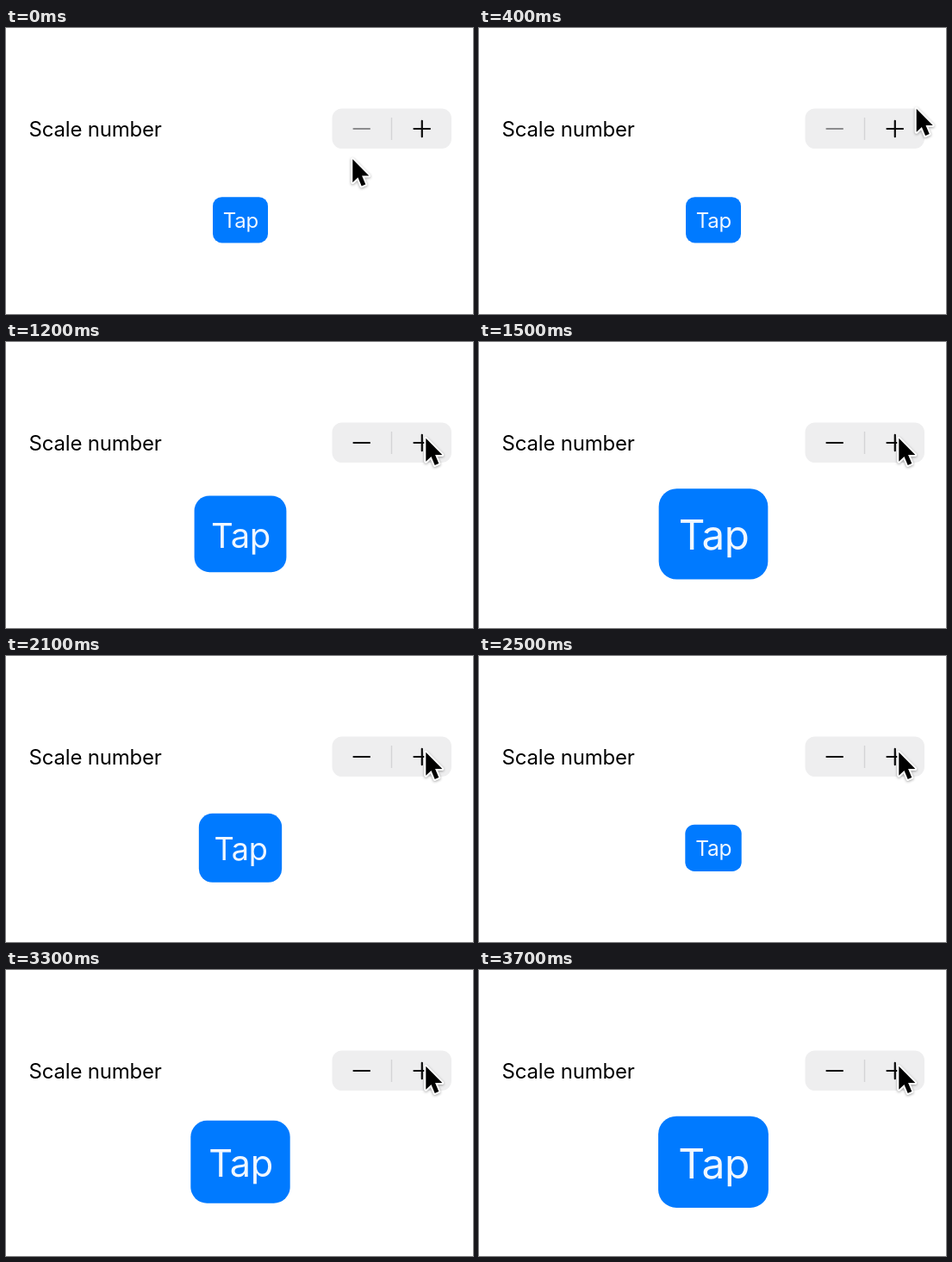
Write an HTML page that moves like this. It is 542 px wide and 332 px high and loops after 3.85 s.

```html
<!DOCTYPE html>
<html lang="en">
<head>
<meta charset="utf-8">
<title>Scale stepper</title>
<style>
  html, body { margin: 0; width: 100%; height: 100%; overflow: hidden; background: #fff; }
  svg { display: block; width: 542px; height: 332px; }
  text { font: 400 24px Inter, Roboto, sans-serif; letter-spacing: -.2px; }
  .sign { stroke: #0b0b0b; stroke-width: 2.2; stroke-linecap: round; }
  #cursor { filter: drop-shadow(0 1.5px 1.5px rgba(0, 0, 0, .35)); }
</style>
</head>
<body>
<svg viewBox="0 0 542 332">
  <text x="26.6" y="126">Scale number</text>

  <rect x="378.5" y="93.5" width="138.5" height="46.5" rx="11.5" fill="#eeeeef"/>
  <path id="press" d="M448 93.5H505.5A11.5 11.5 0 0 1 517 105V128.5A11.5 11.5 0 0 1 505.5 140H448Z" fill="#dedee0"/>
  <path d="M447.5 104V130" stroke="#d4d4d6" stroke-width="1.5"/>
  <path id="minus" class="sign" d="M403.5 117H422"/>
  <path class="sign" d="M473.5 117H492M482.8 107.8V126.2"/>

  <g id="button">
    <rect x="-32" y="-26.6" width="64" height="53.2" rx="10.5" fill="#007aff"/>
    <text x=".3" y="9.4" text-anchor="middle" fill="#fff" fill-opacity=".94">Tap</text>
  </g>

  <path id="cursor" d="M0 0V27L6.2 21.2L10.4 31.2L15 29.2L10.8 19.3H19Z"
        stroke="#fff" stroke-width="4" stroke-linejoin="round" paint-order="stroke"/>
</svg>
<script>
  const LOOP = 3850, STEP = 100, LAST = 3640;
  const TAP = 597, LEG = 1004;
  const [press, minus, button, cursor] =
    ['press', 'minus', 'button', 'cursor'].map(id => document.getElementById(id));

  const clamp = v => Math.min(1, Math.max(0, v));
  const bezier = (a, b, c, d, t) => {
    const u = 1 - t;
    return u * u * u * a + 3 * u * u * t * b + 3 * u * t * t * c + t * t * t * d;
  };

  // cubic-bezier(.42, 0, .58, 1), solved by bisection
  function easeInOut(x) {
    let lo = 0, hi = 1;
    for (let i = 0; i < 24; i++) {
      const mid = (lo + hi) / 2;
      if (bezier(0, .42, .58, 1, mid) < x) lo = mid; else hi = mid;
    }
    return bezier(0, 0, 1, 1, lo);
  }

  // Grows from 1 to 2 and back, one leg each way
  function scaleAt(t) {
    const phase = Math.max(0, t - TAP) / LEG % 2;
    return 1 + easeInOut(phase < 1 ? phase : 2 - phase);
  }

  function draw(now) {
    const t = Math.min(LAST, Math.floor(now % LOOP / STEP) * STEP);
    const p = easeInOut(clamp((t - 20) / 540));
    const x = bezier(402.3, 440, 555, 487.3, p);
    const y = bezier(152.3, 30, 80, 111.8, p);

    cursor.setAttribute('transform', `translate(${x} ${y})`);
    button.setAttribute('transform', `translate(272 222.8) scale(${scaleAt(t)})`);
    press.style.visibility = t === 600 ? 'visible' : 'hidden';
    minus.style.stroke = t < 600 ? '#8c8c8e' : '';
  }

  const start = performance.now();
  function tick() {
    draw(performance.now() - start);
    requestAnimationFrame(tick);
  }
  tick();
</script>
</body>
</html>
```
